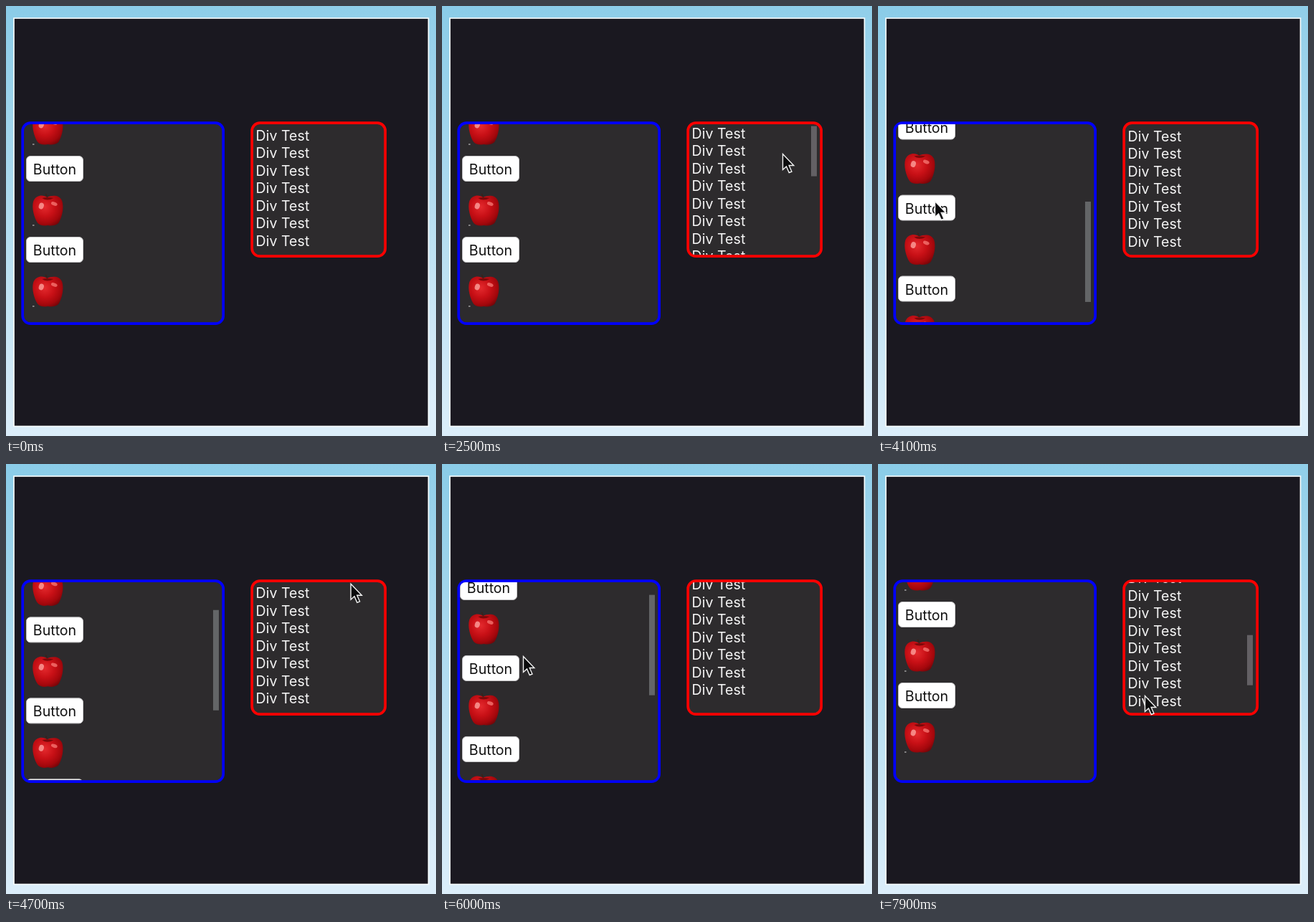
An HTML page for the animation above (8 s loop, 600 px wide and 600 px high).

```html
<!DOCTYPE html>
<html lang="en">
<head>
<meta charset="utf-8">
<title>Scrolling panels</title>
<style>
  html, body { margin: 0; width: 100%; height: 100%; overflow: hidden; }
  svg { display: block; width: 100vw; height: 100vh; }
  text { font: 19.6px Inter, "Open Sans", sans-serif; }
</style>
</head>
<body>
<svg viewBox="0 0 600 600">
  <defs>
    <linearGradient id="sky" x1="0" y1="0" x2="0.08" y2="1">
      <stop offset="0" stop-color="#8accE8"/>
      <stop offset="0.5" stop-color="#b2dcf0"/>
      <stop offset="1" stop-color="#dceefa"/>
    </linearGradient>
    <radialGradient id="skin" cx="0.4" cy="0.38" r="0.7">
      <stop offset="0" stop-color="#e42a2e"/>
      <stop offset="0.45" stop-color="#c81016"/>
      <stop offset="0.8" stop-color="#a3070c"/>
      <stop offset="1" stop-color="#700609"/>
    </radialGradient>
    <clipPath id="leftView"><rect x="25" y="165" width="276" height="276" rx="8"/></clipPath>
    <clipPath id="rightView"><rect x="345" y="165" width="182" height="182" rx="8"/></clipPath>
    <g id="apple">
      <path d="M-1 -17Q-1 -20 -3 -23" fill="none" stroke="#3c2018" stroke-width="1.6"/>
      <path d="M-1 -18C-6 -22 -16 -22 -20 -13C-23 -4 -19 11 -14 18C-10 22 -5 22 0 21C5 22 10 22 15 18C20 10 23 -4 20 -13C16 -22 6 -21 -1 -18Z" fill="url(#skin)"/>
      <path d="M-8 -17Q-1 -12 8 -17Q-1 -19 -8 -17Z" fill="#7c0809"/>
      <ellipse cx="-9" cy="-6" rx="3.5" ry="4.5" transform="rotate(18 -9 -6)" fill="#ffaaa4" opacity="0.75"/>
      <ellipse cx="9" cy="-9" rx="4.5" ry="2.5" transform="rotate(20 9 -9)" fill="#ff8a84" opacity="0.65"/>
    </g>
  </defs>
  <rect width="600" height="600" fill="url(#sky)"/>
  <rect x="11" y="17" width="578.5" height="569.5" fill="#1a1820" stroke="#f6fbfd" stroke-width="1.7"/>

  <rect x="23.2" y="163.2" width="280" height="280" rx="11" fill="#2d2b2d" stroke="#00f" stroke-width="3.7"/>
  <g clip-path="url(#leftView)">
    <g id="items"></g>
    <rect id="leftThumb" x="289" width="8" height="140" fill="#636567"/>
  </g>

  <rect x="343.2" y="163.2" width="186" height="186" rx="11" fill="#2d2b2d" stroke="#f00" stroke-width="3.7"/>
  <g clip-path="url(#rightView)">
    <g id="lines" fill="#f4f4f4"></g>
    <rect id="rightThumb" x="515" width="8" height="70" fill="#636064"/>
  </g>

  <path id="cursor" d="M0.5 0.5V22.5L5.5 18L9.3 26.5L13 25L9.2 16.5H15.8Z" fill="#0b0b0c" stroke="#f2f2f2" stroke-width="1.4"/>
</svg>
<script>
const LOOP = 8000, STEP = 100;
const ITEM_GAP = 113, LINE_GAP = 24.5;
const $ = id => document.getElementById(id);

// Smooth progress from 0 to 1 between two times
function ease(t, from, to) {
  const k = Math.min(1, Math.max(0, (t - from) / (to - from)));
  return k * k * (3 - 2 * k);
}

// Offset of the left list from its top
const leftScroll = t => 311 - 311 * ease(t, 3700, 5200) + 328 * ease(t, 5850, 6700);

// Height of the last line in the right list
const lastLine = t => 327.5 + 390 * ease(t, 1300, 2400) - 389 * ease(t, 2450, 4000)
  - 13.5 * ease(t, 4500, 5400) + 138 * ease(t, 7100, 7900);

// Stops of the pointer: time, x, y
const stops = [
  [100, 580, 484], [1000, 475, 206], [3100, 475, 206], [3300, 242, 251],
  [3600, 1, 262], [4100, 79, 272], [4500, 575, 142], [5200, 99, 267],
  [6000, 113, 268], [6800, 44, 401], [7400, 526, 300], [7900, 372, 323]
];

function pointer(t) {
  let [, x, y] = stops[0];
  for (let i = 1; i < stops.length; i++) {
    const [from, x0, y0] = stops[i - 1], [to, x1, y1] = stops[i];
    const k = ease(t, from, to);
    x += (x1 - x0) * k;
    y += (y1 - y0) * k;
  }
  return [x, y];
}

const show = (el, on) => el.setAttribute("visibility", on ? "visible" : "hidden");
const move = (el, x, y) => el.setAttribute("transform", `translate(${x} ${y})`);

for (let i = 0; i < 5; i++) {
  const y = 200 + i * ITEM_GAP, x = i ? 28 : 25;
  $("items").innerHTML += `
    <rect x="${x + 0.5}" y="${y - 18.5}" width="79" height="35" rx="5.5" fill="#fff" stroke="#c9c8ca"/>
    <text x="${x + 40}" y="${y + 7}" text-anchor="middle" fill="#111">Button</text>
    <use href="#apple" x="58.3" y="${y + 57}"/>
    <rect class="speck" x="37" y="${y + 77.5}" width="2.5" height="1" fill="#dedede"/>`;
}
for (let i = 0; i < 24; i++) {
  $("lines").innerHTML += `<text x="348.6" y="${7.4 - i * LINE_GAP}">Div Test</text>`;
}
const specks = document.querySelectorAll(".speck");

function draw(t) {
  const scroll = leftScroll(t), last = lastLine(t);

  move($("items"), 0, -scroll);
  move($("lines"), 0, last);
  $("leftThumb").setAttribute("y", 172 + scroll / 2.54);
  $("rightThumb").setAttribute("y", 241 - (last - 444.5) / 3.7);
  show($("leftThumb"), t >= 3600 && t < 6700);
  show($("rightThumb"), (t >= 1400 && t < 4000) || t >= 7300);
  specks.forEach(s => show(s, scroll > 300));

  move($("cursor"), ...pointer(t));
  show($("cursor"), t >= 100);
}

const start = performance.now();
function tick(now) {
  const t = Math.max(0, now - start) % LOOP;
  draw(Math.floor(t / STEP) * STEP);
  requestAnimationFrame(tick);
}
draw(0);
requestAnimationFrame(tick);
</script>
</body>
</html>
```
